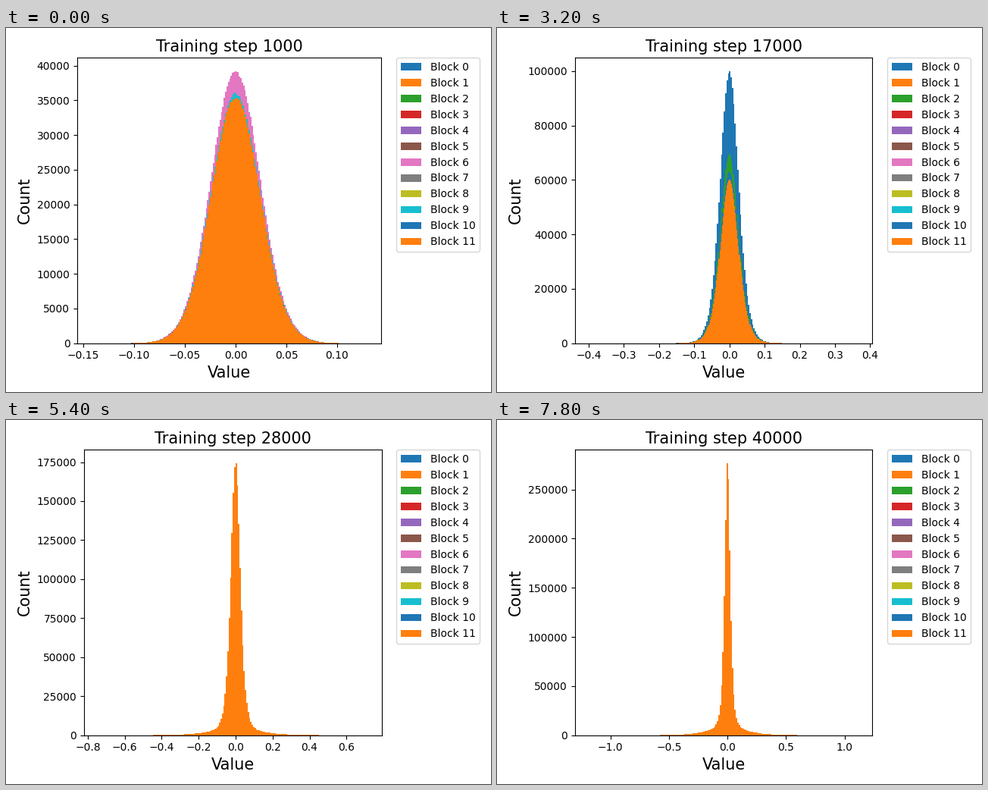
These frames come from a looping animation (640x480 px, 8000 ms). A matplotlib script:

```python
import matplotlib.pyplot as plt
import numpy as np
from matplotlib.animation import FuncAnimation

BINS = 200
STEPS = 40
LAST = 11
WEIGHTS = 768 * 2304    # weights per block


def curve(*points):
    """Piecewise linear function of the step through a few key points."""
    keys, values = zip(*points)
    return lambda step: np.interp(step, keys, values)


# Range of values in the first and the last block
first_span = curve((1, 0.24), (6, 0.547), (10, 0.699), (17, 0.769))
last_span = curve((1, 0.246), (6, 0.395), (10, 0.395), (17, 0.465),
                  (22, 1.143), (24, 1.345), (33, 1.612), (40, 2.309))

# Blocks that widen for a while: step, duration, extra range
BUMPS = {1: (6, 2, 0.097), 2: (17, 3, 0.163), 4: (6, 2, 0.073),
         6: (1, 2, 0.037), 9: (1, 2, 0.016)}

# Share of the range below zero, core width, and the exponential tail
below = curve((1, 0.523), (6, 0.493), (10, 0.521), (17, 0.521),
              (24, 0.503), (33, 0.52), (40, 0.514))
sigma = curve((1, 0.024), (6, 0.0221), (10, 0.0231), (17, 0.025),
              (24, 0.0251), (33, 0.0217), (40, 0.0202))
tail_share = curve((1, 0), (17, 0.03), (24, 0.057), (40, 0.066))
tail_length = curve((17, 0.04), (24, 0.085), (33, 0.115), (40, 0.125))


def span_of(block, step):
    if block == 0:
        return first_span(step)
    if block == LAST:
        return last_span(step)
    span = 0.235 + 0.14 * np.tanh((step - 1) / 3)
    if block == 10:
        span += 0.007 * (step - 1)
    if block in BUMPS:
        center, width, extra = BUMPS[block]
        span += extra * np.exp(-((step - center) / width) ** 2 / 2)
    return span


def histogram(block, step, rng):
    """Counts and bin edges of one block's weights."""
    span = span_of(block, step)
    low = -below(step) * span
    edges = np.linspace(low, low + span, BINS + 1)
    x = (edges[1:] + edges[:-1]) / 2

    # Nearly Gaussian at first, more peaked as training goes on
    power = 3 + 9 * np.exp(-(step - 1) / 1.5) - 1.65 * max(0, step - 17) / 23
    core = np.cosh(x / (sigma(step) * power ** 0.5)) ** -power
    tail = np.exp(-np.abs(x) / tail_length(step))
    share = tail_share(step) if block else 0
    shape = (1 - share) * core + share * tail

    counts = WEIGHTS * shape / shape.sum()
    noisy = counts + 0.6 * np.sqrt(counts) * rng.standard_normal(BINS)
    return np.maximum(noisy, 0) * counts.max() / noisy.max(), edges


fig = plt.figure(figsize=(6.4, 4.8), dpi=100)


def reset():
    fig.subplots_adjust(left=0.147, right=0.774, bottom=0.134, top=0.918)


def draw(i):
    step = i + 1
    rng = np.random.default_rng(step)
    fig.clear()
    ax = fig.add_subplot()
    for block in range(LAST + 1):
        counts, edges = histogram(block, step, rng)
        ax.stairs(counts, edges, fill=True, lw=0,
                  color=f"C{block % 10}", label=f"Block {block}")
    ax.set_title(f"Training step {step * 1000}", fontsize=15)
    ax.set_xlabel("Value", fontsize=15)
    ax.set_ylabel("Count", fontsize=15)
    ax.legend(bbox_to_anchor=(1.05, 1), loc="upper left", borderaxespad=0)
    fig.tight_layout()
    return []


anim = FuncAnimation(fig, draw, frames=STEPS, init_func=reset, interval=200,
                     repeat=True, repeat_delay=0)
plt.show()
```
